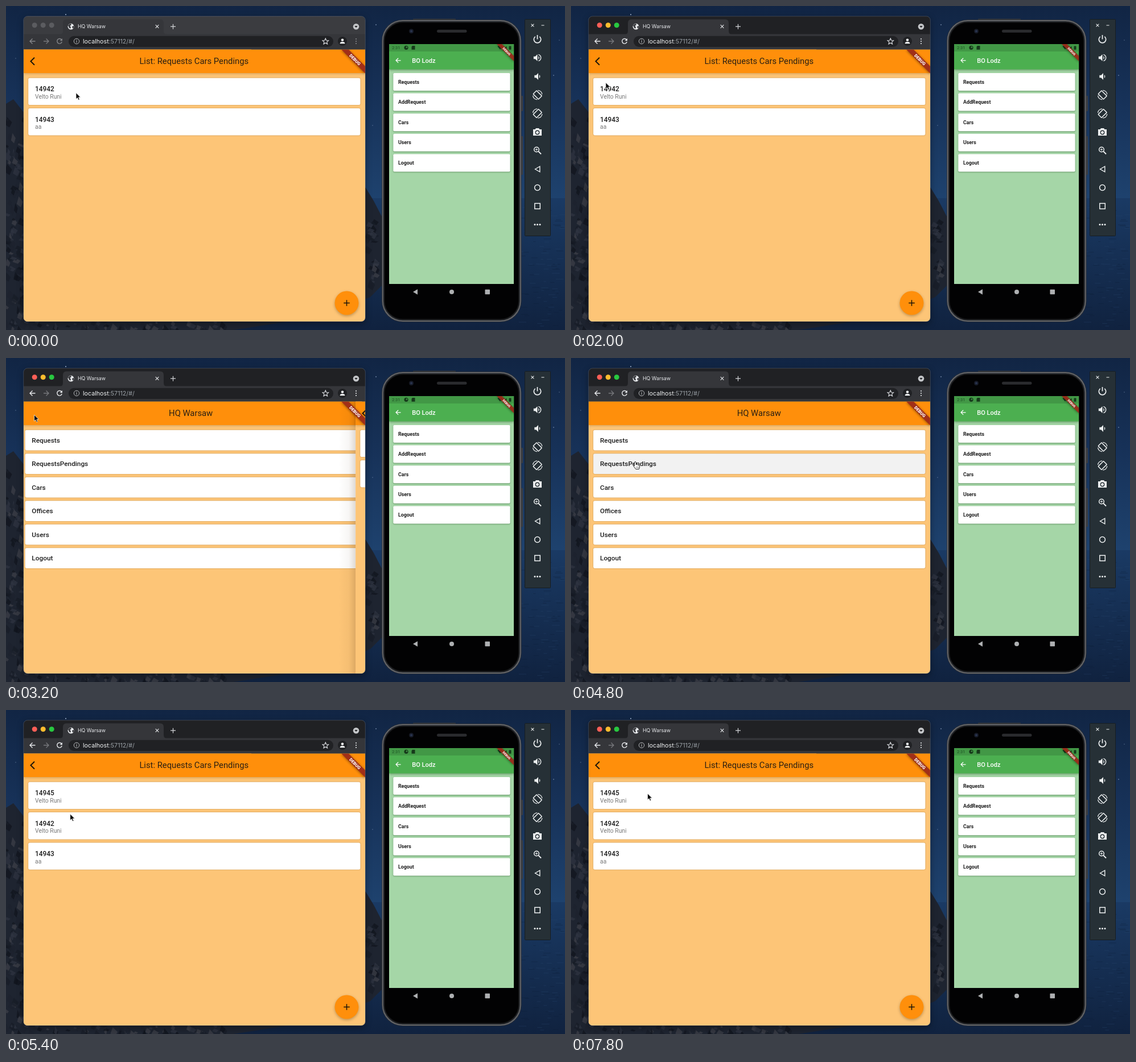
These frames come from a looping animation (982x570 px, 8 s). An HTML page:

```html
<!DOCTYPE html>
<html lang="en">
<head>
<meta charset="utf-8">
<title>Two offices</title>
<style>
html, body { margin: 0; width: 100%; height: 100%; overflow: hidden; background: #10264a; }
svg { display: block; }
text { font-family: Roboto, Arial, sans-serif; white-space: pre; }
.ui { font-family: Inter, Roboto, sans-serif; }
.card { filter: drop-shadow(0 .8px 1.2px rgba(60, 35, 0, .32)); }
.bar { filter: drop-shadow(0 1.5px 2px rgba(70, 40, 0, .25)); }
.line { fill: none; stroke: currentColor; stroke-width: 1.4; }
</style>
</head>
<body>
<svg id="stage" width="982" height="570" viewBox="0 0 982 570"></svg>
<script>
const ORANGE = '#ff8f0b', PEACH = '#fdc577', STRIP = '#202124', TOOL = '#35363a';
const LOOP = 8000, STEP = 200;
const POP = 2931, PUSH = 4820, SLIDE = 400, LOADED = 5400, FOCUS = 1000;

const rect = (x, y, w, h, fill, r = 0, more = '') =>
  `<rect x="${x}" y="${y}" width="${w}" height="${h}" rx="${r}" fill="${fill}" ${more}/>`;
const circle = (x, y, r, fill, more = '') => `<circle cx="${x}" cy="${y}" r="${r}" fill="${fill}" ${more}/>`;
const path = (d, fill, more = '') => `<path d="${d}" fill="${fill}" ${more}/>`;
const line = (d, color, width = 1.4, more = '') =>
  `<path d="${d}" fill="none" stroke="${color}" stroke-width="${width}" ${more}/>`;
const text = (x, y, size, str, fill, weight = 400, more = '') =>
  `<text x="${x}" y="${y}" font-size="${size}" fill="${fill}" font-weight="${weight}" ${more}>${str}</text>`;
const group = (id, body, more = '') => `<g id="${id}" ${more}>${body}</g>`;
const at = (x, y, body, scale = 1, turn = 0) =>
  `<g transform="translate(${x} ${y}) rotate(${turn}) scale(${scale})">${body}</g>`;

let seed = 7;
const random = () => (seed = (seed * 16807) % 2147483647) / 2147483647;

function landscape() {
  const tones = ['#10141d', '#2f3541', '#1c222e', '#3d4049', '#171c27'];
  const rock = (x, y) => {
    const s = 3 + random() * 7, k = 2 + random() * 8;
    return path(`M${x} ${y}l${s} ${k}l${-s * .5} ${k}l${-s} ${-k * .6}z`, tones[random() * 5 | 0], 'opacity=".7"');
  };
  let rocks = '', ripples = '';
  for (let i = 0; i < 110; i++) rocks += rock(random() * 32, 195 + random() * 360);
  for (let i = 0; i < 70; i++) rocks += rock(random() * 390, 552 + random() * 14);
  for (let i = 0; i < 30; i++) rocks += rock(632 + random() * 18, 375 + random() * 110);
  for (let i = 0; i < 90; i++) {
    ripples += line(`M${900 + random() * 75} ${345 + random() * 220}h${4 + random() * 10}`, i % 2 ? '#27476f' : '#0d1c36', .8, 'opacity=".45"');
  }
  return rect(0, 0, 982, 338, 'url(#sky)') + rect(0, 338, 982, 232, 'url(#sea)') + ripples +
    path('M0 570V172L13 164L31 187L300 150L600 300L632 320L646 343L662 374L670 482L640 512L560 545L400 570Z', '#1e2430') +
    rocks +
    [[105, 15, 1], [650, 33, .8], [962, 122, .7], [17, 92, .5], [644, 210, .5], [972, 60, .5]]
      .map(([x, y, r]) => circle(x, y, r, '#a9bedb')).join('');
}

function banner(x, y, k, size) {
  const a = 29.4 * k, b = 42 * k, c = (a + b) / 4;
  return path(`M${x - b} ${y}H${x - a}L${x} ${y + a}V${y + b}Z`, '#9c2a1a', 'opacity=".94" style="filter:drop-shadow(0 1px 2px rgba(0,0,0,.5))"') +
    at(x - c, y + c, text(0, size * .36, size, 'DEBUG', '#fff', 900, 'text-anchor="middle"'), 1, 45);
}

const card = (y, h, id = '') => rect(39.2, y, 583.2, h, '#fff', 2.8, `class="card" ${id && `id="${id}"`}`);

function page(title, body) {
  return rect(31, 76.5, 600, 480, PEACH) + body +
    rect(31, 76.5, 600, 41.5, ORANGE, 0, 'class="bar"') +
    text(330.3, 102.4, 14.8, title, '#2b2013', 400, 'text-anchor="middle"');
}

function menuPage() {
  const names = ['Requests', 'RequestsPendings', 'Cars', 'Offices', 'Users', 'Logout'];
  return page('HQ Warsaw', names.map((name, i) => {
    const y = 126.7 + i * 41.5;
    return card(y, 35.7, 'item' + i) + text(51, y + 22.2, 11.8, name, '#1d1d1d', 500);
  }).join(''));
}

function listItems(rows) {
  return rows.map(([number, car], i) => {
    const y = 126.7 + i * 53.4;
    return card(y, 47.3) + text(51, y + 23.6, 11.87, number, '#1d1d1d', 500) +
      text(51, y + 36.1, 10.4, car, '#787878');
  }).join('') +
    circle(598.5, 522.5, 21, ORANGE, 'style="filter:drop-shadow(0 2px 2.5px rgba(60,35,0,.32))"') +
    line('M593.2 522.5h10.6M598.5 517.2v10.6', '#1b1409', 1.5);
}

function listPage() {
  const rows = [['14942', 'Velto Runi'], ['14943', 'aa']];
  return rect(1, 76.5, 30, 480, 'url(#edge)') +
    page('List: Requests Cars Pendings',
      group('before', listItems(rows)) +
      group('after', listItems([['14945', 'Velto Runi'], ...rows])) +
      line('', ORANGE, 3, 'id="spinner"')) +
    line('M50 90.8L43.4 97.3L50 103.8', '#1b1409', 1.9);
}

function browser() {
  const lights = [['#ff5f57', 50], ['#febc2e', 65], ['#28c840', 80]];
  const chrome = rect(31, 18, 600, 80, STRIP, 7, 'id="strip"') +
    lights.map(([c, x]) => circle(x + .2, 33.8, 4.5, c, `class="light" data-color="${c}"`)).join('') +
    path('M94 50Q100 50 100 44V30Q100 23.5 106 23.5H271Q277 23.5 277 30V44Q277 50 283 50Z', TOOL) +
    rect(31, 49.5, 600, 27.5, TOOL) +
    circle(114, 36.2, 5.4, '#e8eaed') + path('M110 33q3-3 5-1l-1 2-2 1 2 2-1 3q-3-2-4-6zm6 3l3-1q1 3-2 4.5z', TOOL) +
    text(126, 39.3, 8.8, 'HQ Warsaw', '#e8eaed', 400, 'class="ui"') +
    line('M262.7 33.2l5.6 5.6m0-5.6l-5.6 5.6', '#e0e2e5', 1.2) +
    line('M289 36.2h9M293.5 31.7v9', '#d5d7da', 1.2) +
    circle(615, 36.2, 5.3, '#c4c6c9') + path('M612.3 35h5.4l-2.7 3.3z', STRIP) +
    rect(110, 52.7, 465, 19.3, STRIP, 9.6) +
    `<g id="nav" color="#e8eaed">${
      path('M51.5 62h-9M46.5 57.5L42 62l4.5 4.5', 'none', 'class="line"')}${
      path('M97.7 59.5a4.3 4.3 0 1 0 .5 3.5', 'none', 'class="line"')}${
      path('M98.9 57v4.3h-4.3z', 'currentColor')}${
      [58, 62, 66].map(y => circle(615, y, 1.1, 'currentColor')).join('')}</g>` +
    line('M66 62h9M70.5 57.5L75 62l-4.5 4.5', '#77787c', 1.3) +
    circle(124, 62, 4.7, 'none', 'stroke="#b8babd"') + line('M124 61.3v3.2M124 59.2v1.2', '#b8babd', 1.1) +
    `<text x="135" y="65.8" font-size="10.7" fill="#f1f3f4" class="ui">localhost<tspan fill="#9aa0a6">:57112/#/</tspan></text>` +
    path('M561.3 57l1.5 3.5 3.8.3-2.9 2.5.9 3.7-3.3-2-3.3 2 .9-3.7-2.9-2.5 3.8-.3z', 'none', 'stroke="#dfe1e5" stroke-width="1.1"') +
    circle(591, 62, 8, '#1f2023') + circle(591, 59.8, 2.3, '#f1f3f4') +
    path('M586.5 66.3q0-3.4 4.5-3.4t4.5 3.4z', '#f1f3f4');
  return rect(31, 18, 600, 537, '#222', 7, 'style="filter:drop-shadow(0 3px 6px rgba(0,0,0,.4))"') +
    `<g clip-path="url(#window)">${chrome}<g clip-path="url(#view)">${
      group('menu', menuPage())}${group('list', listPage())}${banner(631, 76.5, 1, 7.6)}</g></g>` +
    rect(30.7, 18, 600.6, 537, 'none', 7, 'stroke="#fff" stroke-opacity=".2" stroke-width=".8"');
}

function phone() {
  const items = ['Requests', 'AddRequest', 'Cars', 'Users', 'Logout'].map((name, i) => {
    const y = 118 + i * 35.6;
    return rect(680.3, y, 205.3, 31, '#fff', 2, 'style="filter:drop-shadow(0 1px 1px rgba(0,50,0,.4))"') +
      text(689, y + 18.5, 8.8, name, '#1c1c1c', 700);
  }).join('');
  return rect(904, 158, 4, 27, '#3c3e42', 1) + rect(904, 229, 4, 68, '#3c3e42', 1) + rect(715, 22.5, 75, 3, '#36383b', 1) +
    rect(660, 24, 245.5, 532, '#34363a', 37) +
    rect(661.7, 25.7, 242.1, 528.6, 'none', 35.3, 'stroke="#75777b" stroke-width="1.2"') +
    rect(664.6, 28.6, 236.3, 522.8, '#020203', 32.5, 'stroke="#17181a" stroke-width="1.6"') +
    rect(757, 41.7, 52.5, 5, '#2a2b2e', 2.5) +
    circle(712, 44.3, 4, '#171b27') + circle(712, 44.3, 2, '#29344f') +
    `<g clip-path="url(#screen)">${rect(673, 67, 219.3, 422, '#a5d6a7')}${items}${
      rect(673, 67, 219.3, 44.5, '#4caf50', 0, 'style="filter:drop-shadow(0 1px 2px rgba(0,50,0,.4))"')}${
      rect(673, 67, 219.3, 13, '#429846')}${
      text(678, 76.3, 7.5, '2:31', '#1c4d22')}${
      circle(703, 73.3, 3.6, '#163a1b')}${circle(704, 72.5, 1.3, '#429846')}${
      path('M713.8 70h4.7v6.7h-6v-5z', '#163a1b')}${
      path('M863.5 71q5-3.5 9 0l-4.5 5.5zM873.5 76.5l6-6v6z', '#163a1b')}${
      rect(883.5, 70.5, 4, 6.3, '#163a1b', .6)}${
      line('M693.5 95.8h-8.3M689.2 91.7l-4.2 4.1 4.2 4.1', '#fff', 1.2)}${
      text(713.3, 99.9, 11, 'BO Lodz', '#fff', 500)}${
      banner(892.3, 67, .718, 5.4)}</g>` +
    path('M715 503l8-4.8v9.6z', '#aeb0b2') + circle(783, 503, 4, '#aeb0b2') + rect(841.5, 498.8, 8.5, 8.5, '#aeb0b2', .8);
}

function controls() {
  const W = '#eef1f2';
  const speaker = 'M-9-3v6h4l5 5V-8l-5 5z', wave = 'M2.5-4a5 5 0 0 1 0 8z';
  const rotate = (y, side) => at(933.7, y, `<g transform="scale(${side} 1)">` +
    rect(-4.2, -6.6, 8.4, 13.2, 'none', .8, `transform="rotate(-45)" stroke="${W}" stroke-width="1.5"`) +
    line('M.5-8.2q6.500 .5 7.700 7M-.5 8.2q-6.500-.5-7.700-7', W, 1.2) + '</g>');
  return rect(911.5, 23.5, 45, 381, '#263036', 1, 'stroke="#161d22"') +
    line('M922.6 31.6l4.8 4.8m0-4.800l-4.8 4.8M940.5 34h5', W, 1.1) +
    at(933.5, 58.5, line('M-3.8-4.7a6.2 6.2 0 1 0 7.6 0M0-7.5v7.5', W, 1.7)) +
    at(933.5, 91, path(speaker + wave, W) + line('M2.5-7.7a8 8 0 0 1 0 15.4', W, 1.9), .74) +
    at(935, 124, path(speaker + wave, W), .74) +
    rotate(156.5, 1) + rotate(189, -1) +
    at(933.5, 221.5, path('M-7.5-4.5h3.5l1.5-2h5l1.5 2h3.5v11h-15z', W) +
      circle(0, 1, 3.2, 'none', 'stroke="#263036" stroke-width="1.4"')) +
    at(933.5, 254, circle(-1.5, -1.5, 4.3, 'none', `stroke="${W}" stroke-width="1.5"`) +
      line('M1.7 1.7L6.5 6.5', W, 1.9) + line('M-3.7-1.5h4.4M-1.5-3.7v4.4', W, 1)) +
    path('M929.5 287l8.3-4.8v9.6z', 'none', `stroke="${W}" stroke-width="1.4"`) +
    circle(933.5, 319.5, 4.9, 'none', `stroke="${W}" stroke-width="1.5"`) +
    rect(928.8, 347.3, 9.5, 9.5, 'none', 0, `stroke="${W}" stroke-width="1.5"`) +
    [929, 933.5, 938].map(x => circle(x, 384.5, 1.5, W)).join('');
}

const cursors =
  group('arrow', path('M0 0V11L2.6 8.7L4.3 12.7L6.2 11.9L4.5 8H8Z', '#0a0a0a', 'stroke="#fff" stroke-width=".7"')) +
  group('hand', path('M-1 1.2Q-1-.6.3-.6T1.7 1V4.5Q3.2 3.6 3.9 4.9Q5.5 4.3 6 5.6Q8 5.2 8 7.2Q8 10 6.8 12.5H1.2Q-.5 10-2.6 7.6Q-2.5 5.8-1 6.8Z',
    '#fff', 'stroke="#111" stroke-width=".9"') + line('M2.1 8v2.5M4 8v2.5M5.8 8v2.5', '#333', .6));

const gradient = (id, stops, across = 0) =>
  `<linearGradient id="${id}" x1="0" y1="0" x2="${across}" y2="${1 - across}">${
    stops.map(([o, c, a = 1]) => `<stop offset="${o}" stop-color="${c}" stop-opacity="${a}"/>`).join('')}</linearGradient>`;
const clip = (id, shape) => `<clipPath id="${id}">${shape}</clipPath>`;

document.getElementById('stage').innerHTML = `<defs>${
  gradient('sky', [[0, '#112544'], [.5, '#173259'], [1, '#1e426e']])}${
  gradient('sea', [[0, '#1a3a64'], [1, '#10223f']])}${
  gradient('edge', [[0, '#402000', 0], [.6, '#402000', .04], [1, '#402000', .17]], 1)}${
  clip('window', rect(31, 18, 600, 537, '#000', 7))}${
  clip('view', rect(31, 76.5, 600, 479, '#000'))}${
  clip('screen', rect(673, 67, 219.3, 422, '#000'))}</defs>` +
  landscape() + browser() + phone() + controls() + group('cursor', cursors);

const $ = id => document.getElementById(id);
const show = (id, on) => $(id).setAttribute('display', on ? 'inline' : 'none');
const move = (id, x, y = 0) => $(id).setAttribute('transform', `translate(${x} ${y})`);

// time, x, y
const track = [
  [0, 123, 152.7], [1200, 123, 152.7], [2000, 61, 134.7], [2600, 48, 99], [3000, 49, 100], [3400, 50, 100],
  [4400, 112.5, 183], [5400, 112.7, 183], [6400, 122, 171], [7400, 134.5, 147], [LOOP, 134.5, 147]
];

function pointer(t) {
  const i = track.findIndex(k => k[0] > t), [t0, x0, y0] = track[i - 1], [t1, x1, y1] = track[i];
  const p = (t - t0) / (t1 - t0), e = p * p * (3 - 2 * p);
  return [x0 + (x1 - x0) * e, y0 + (y1 - y0) * e];
}

// Route easing: cubic-bezier(.35, .91, .33, .97)
function slide(p) {
  if (p <= 0 || p >= 1) return p <= 0 ? 0 : 1;
  const bezier = (s, a, b) => 3 * (1 - s) ** 2 * s * a + 3 * (1 - s) * s * s * b + s ** 3;
  let lo = 0, hi = 1;
  for (let i = 0; i < 20; i++) {
    const mid = (lo + hi) / 2;
    if (bezier(mid, .35, .33) < p) lo = mid; else hi = mid;
  }
  return bezier(lo, .91, .97);
}

function arc(t) {
  const age = t - PUSH, from = -93 + .14 * age, sweep = .414 * age - 27;
  const point = deg => {
    const a = deg * Math.PI / 180;
    return `${331 + 12.9 * Math.cos(a)} ${336.7 + 12.9 * Math.sin(a)}`;
  };
  return `M${point(from)}A12.9 12.9 0 ${sweep > 180 ? 1 : 0} 1 ${point(from + sweep)}`;
}

function draw(t) {
  const away = slide((t - POP) / SLIDE) - slide((t - PUSH) / SLIDE);
  move('list', 600 * away);
  move('menu', -200 * (1 - away));
  show('list', away < 1);

  const loading = t >= PUSH && t < LOADED;
  show('before', t < PUSH);
  show('after', t >= LOADED);
  show('spinner', loading);
  if (loading) $('spinner').setAttribute('d', arc(t));

  const focused = t >= FOCUS;
  $('strip').setAttribute('fill', focused ? STRIP : '#3b3c40');
  $('nav').setAttribute('color', focused ? '#e8eaed' : '#85868a');
  document.querySelectorAll('.light').forEach(l => l.setAttribute('fill', focused ? l.dataset.color : '#5b5c60'));

  const [x, y] = pointer(t);
  let hand = away === 0 && t < POP && x < 58 && y < 110;
  for (let i = 0; i < 6; i++) {
    const top = 126.7 + i * 41.5, over = away === 1 && x > 39 && y > top && y < top + 35.7;
    $('item' + i).setAttribute('fill', over ? '#f2f2f2' : '#fff');
    hand = hand || over;
  }
  move('cursor', x, y);
  show('hand', hand);
  show('arrow', !hand);
}

const start = performance.now();
function tick() {
  const t = (performance.now() - start) % LOOP;
  draw(Math.floor(t / STEP) * STEP);
  requestAnimationFrame(tick);
}
tick();
</script>
</body>
</html>
```
